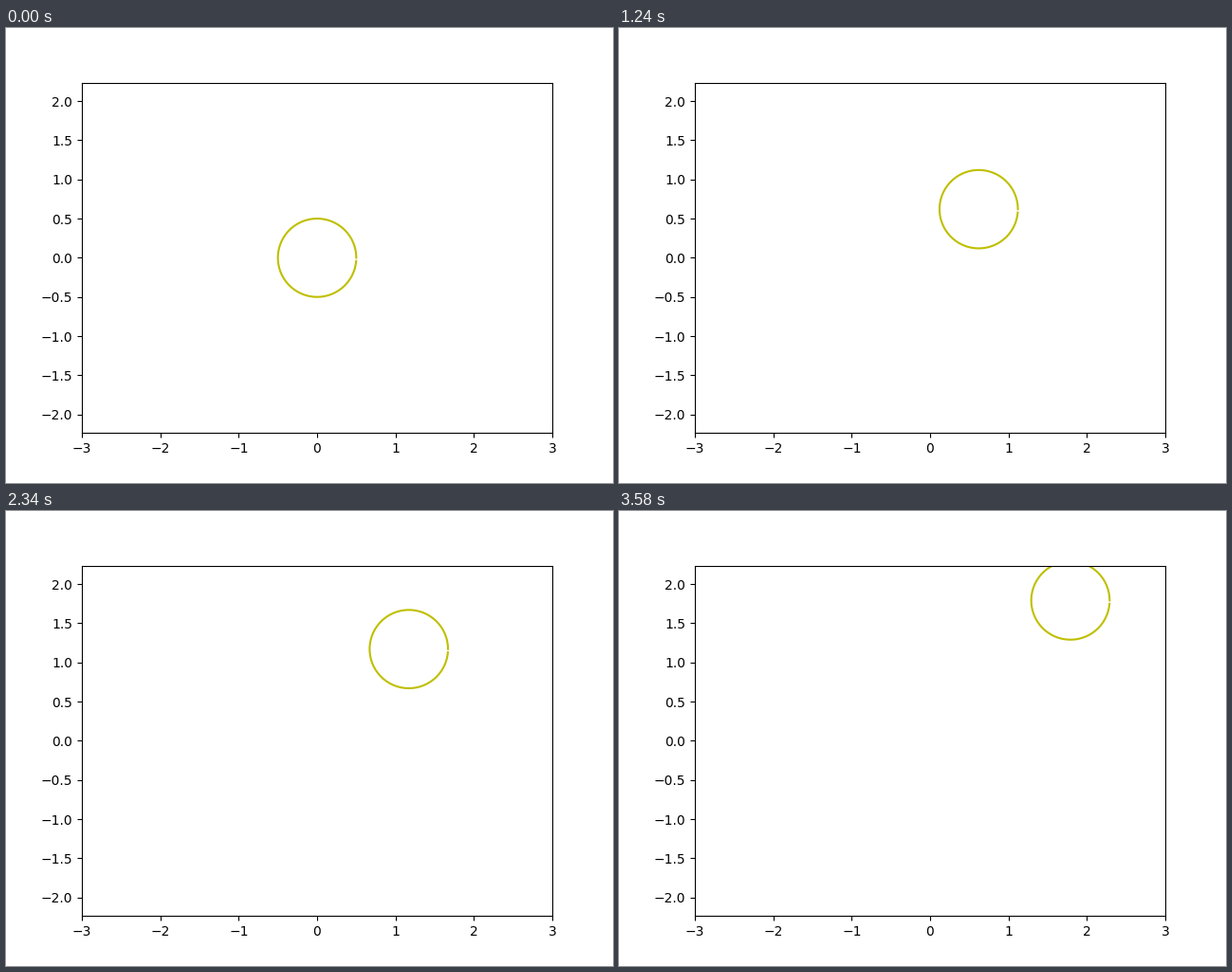
Write a matplotlib script that moves like this. It is 640 px wide and 480 px high and loops after 3600 ms.

```python
import numpy as np
import matplotlib.pyplot as plt
from matplotlib.animation import FuncAnimation

FRAMES = 180
INTERVAL = 20  # ms
STEP = 0.01    # shift of the centre per frame, along x and y
RADIUS = 0.5
X_MAX = 3

fig, ax = plt.subplots(figsize=(6.4, 4.8), dpi=100)

# Equal scale on both axes, centred on the origin
box = ax.get_position()
y_max = X_MAX * (box.height * 4.8) / (box.width * 6.4)
ax.set_xlim(-X_MAX, X_MAX)
ax.set_ylim(-y_max, y_max)

# The step does not divide the full turn, so a small gap stays open
theta = np.arange(0, 2 * np.pi, 0.1)
circle_x = RADIUS * np.cos(theta)
circle_y = RADIUS * np.sin(theta)
line, = ax.plot(circle_x, circle_y, color="y", lw=1.5)


def update(i):
    shift = STEP * i
    line.set_data(circle_x + shift, circle_y + shift)
    return line,


anim = FuncAnimation(fig, update, frames=FRAMES, interval=INTERVAL,
                     repeat=True, repeat_delay=0, blit=False)
plt.show()
```
